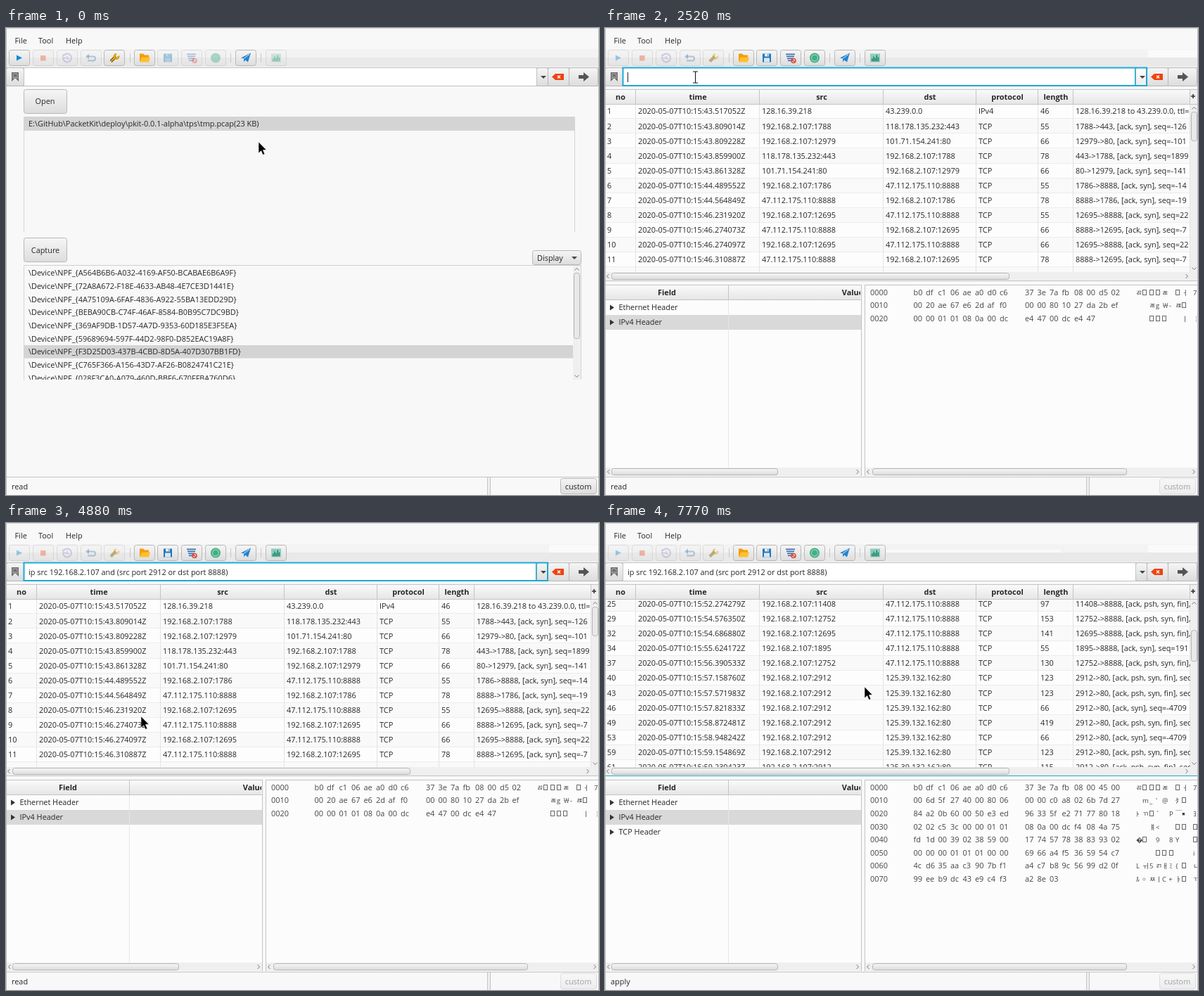
These frames come from a looping animation (843 px wide and 664 px high, 8 s). An HTML page with a canvas:

```html
<!DOCTYPE html>
<html lang="en">
<head>
<meta charset="utf-8">
<title>Packet viewer</title>
<style>
html, body { margin: 0; width: 100%; height: 100%; overflow: hidden; background: #f8f8f8; }
canvas { display: block; }
</style>
</head>
<body>
<canvas id="stage" width="843" height="664"></canvas>
<script>
const c = document.getElementById('stage').getContext('2d');
const LOOP = 8000, FONT = '"Open Sans", "Noto Sans", sans-serif';
const INK = '#262626', BLUE = '#0096c9', FOCUS = '#1fa8d4', GREY = '#d4d4d4', LINE = '#c4c4c4';
const QUERY = 'ip src 192.168.2.107 and (src port 2912 or dst port 8888)';

// Pointer tip: time, x, y; each place holds until the next one.
const POINTER = [
  [0, 359, 162], [260, 357, 157], [400, 350, 142], [1320, 349, 138],
  [1850, 290, 112], [1970, 190, 84], [2090, 128, 70], [2640, 420, 72],
  [2760, 690, 90], [2880, 768, 99], [3030, 785, 90], [3150, 783, 79],
  [3270, 772, 72], [3390, 763, 69], [3510, 759, 67], [3780, 600, 142],
  [3900, 380, 240], [4020, 217, 283], [4140, 198, 286], [4760, 196, 283],
  [4880, 192, 275], [5000, 360, 205], [5120, 620, 130], [5240, 793, 76],
  [5390, 793, 72], [5540, 810, 67], [5660, 814, 66], [6410, 800, 86],
  [6530, 735, 125], [6650, 650, 160], [6770, 560, 185], [6890, 480, 192],
  [7010, 425, 190], [7130, 400, 186], [7400, 396, 194], [7520, 382, 216], [7770, 369, 233]
];
const CARET = [[2520, 3030], [3510, 4020], [4510, 4760], [5390, 5910]];

const DEVICES = `A564B6B6-A032-4169-AF50-BCABAE6B6A9F 72A8A672-F18E-4633-AB48-4E7CE3D1441E
4A75109A-6FAF-4836-A922-55BA13EDD29D BEBA90CB-C74F-46AF-8584-B0B95C7DC9BD
369AF9DB-1D57-4A7D-9353-60D185E3F5EA 59689694-597F-44D2-98F0-D852EAC19A8F
F3D25D03-437B-4CBD-8D5A-407D307BB1FD C765F366-A156-43D7-AF26-B0824741C21E
028F3CA0-A079-460D-BBF6-670FFBA760D6`.split(/\s+/);

const HISTORY = ['udp', 'tcp', 'src port 8000', 'ip src 192.168.43.12', 'arp', 'port 8000',
  'src ip 192.168.2.114', 'ip src 192.168.2.107',
  'ip src 192.168.2.107 and (port src 2912 or port dst 8888)', QUERY];

// L, S, W, T and U shorten recurring addresses; s and f shorten flag sets.
const HOSTS = { L: '192.168.2.107', S: '47.112.175.110:8888', W: '125.39.132.162:80', T: '118.178.135.232:443', U: '101.71.154.241:80' };
const FLAGS = { s: '[ack, syn], seq=', f: '[ack, psh, syn, fin], seq=-4709' };
const host = s => HOSTS[s] || s.replace('L', HOSTS.L);
const port = s => s.split(':')[1];
function parse(text) {
  return text.trim().split('\n').map(line => {
    const [no, time, a, b, len, flag, seq = ''] = line.split(' ');
    const src = host(a), dst = host(b), tcp = flag !== '-';
    return [no, `2020-05-07T10:15:${time}Z`, src, dst, tcp ? 'TCP' : 'IPv4', len,
      tcp ? `${port(src)}->${port(dst)}, ${FLAGS[flag]}${seq}` : `${src} to ${dst}, ttl=`];
  });
}
const ALL = parse(`
1 43.517052 128.16.39.218 43.239.0.0 46 -
2 43.809014 L:1788 T 55 s -126
3 43.809228 L:12979 U 66 s -101
4 43.859900 T L:1788 78 s 1899
5 43.861328 U L:12979 66 s -141
6 44.489552 L:1786 S 55 s -14
7 44.564849 S L:1786 78 s -19
8 46.231920 L:12695 S 55 s 22
9 46.274073 S L:12695 66 s -7
10 46.274097 L:12695 S 66 s 22
11 46.310887 S L:12695 78 s -7
12 47.502161 W L:2912 66 s -18`);
const FILTERED = parse(`
6 44.489552 L:1786 S 55 s -14
8 46.231920 L:12695 S 55 s 22
10 46.274097 L:12695 S 66 s 22
13 47.549643 L:2912 W 123 f
16 48.128443 L:2912 W 123 f
20 49.254737 L:11408 S 55 s 14
23 50.557640 L:2912 W 66 s -4709
25 52.274279 L:11408 S 97 f
29 54.576350 L:12752 S 153 f
32 54.686880 L:12695 S 141 f
34 55.624172 L:1895 S 55 s 191
37 56.390533 L:12752 S 130 f
40 57.158760 L:2912 W 123 f
43 57.571983 L:2912 W 123 f
46 57.821833 L:2912 W 66 s -4709
49 58.872481 L:2912 W 419 f
53 58.948242 L:2912 W 66 s -4709
59 59.154869 L:2912 W 123 f
61 59.230423 L:2912 W 115 f`);

const HEX_A = 'b0dfc106aea0d0c6373e7afb0800d5020020ae67e62daff00000801027da2bef00000101080a00dce44700dce447';
const HEX_B = 'b0dfc106aea0d0c6373e7afb08004500006d5f27400080060000c0a8026b7d27' +
  '84a20b600050e3ed96335fe2717780180202c53c00000101080a00dcf4084a75' +
  'fd1d003902385900177457783883930200000001010100006966a4f5365954c7' +
  '4cd635aac3907bf1a4c7b89c5699d20f99eeb9dc43e9c4f3a28e03';

function rect(x, y, w, h, fill) { c.fillStyle = fill; c.fillRect(x, y, w, h); }
function box(x, y, w, h, stroke, width = 1) {
  c.strokeStyle = stroke; c.lineWidth = width;
  c.strokeRect(x + width / 2, y + width / 2, w - width, h - width);
}
// Baselines sit on whole pixels to keep the letters crisp.
function text(s, x, mid, color = INK, align = 'left', weight = 400) {
  c.font = `${weight} 10.9px ${FONT}`;
  c.textAlign = align; c.fillStyle = color; c.fillText(s, x, Math.round(mid + 3.9));
}
function poly(points, fill) {
  c.beginPath();
  for (let i = 0; i < points.length; i += 2) c.lineTo(points[i], points[i + 1]);
  c.closePath(); c.fillStyle = fill; c.fill();
}
function arc(x, y, r, color, from = 0, to = 7, width = 2) {
  c.beginPath(); c.arc(x, y, r, from, to);
  c.strokeStyle = color; c.lineWidth = width; c.stroke();
}
function path(d, color, width = 1) {
  c.strokeStyle = color; c.lineWidth = width; c.stroke(new Path2D(d));
}
function clip(x, y, w, h, draw) {
  c.save(); c.beginPath(); c.rect(x, y, w, h); c.clip(); draw(); c.restore();
}
function shade(y, h, top, bottom) {
  const g = c.createLinearGradient(0, y, 0, y + h);
  g.addColorStop(0, top); g.addColorStop(1, bottom);
  return g;
}
function round(x, y, w, h, r, fill, stroke, width = 1) {
  c.beginPath(); c.roundRect(x + .5, y + .5, w - 1, h - 1, r);
  c.fillStyle = fill; c.fill();
  c.strokeStyle = stroke; c.lineWidth = width; c.stroke();
}
function button(x, y, w, h, hot, focus) {
  round(x, y, w, h, 3, shade(y, h, hot ? '#fff' : '#f6f6f6', hot ? '#ececec' : '#dcdcdc'), focus ? FOCUS : '#b8b8b8', focus ? 2 : 1);
}
function chevron(x, y, dx, dy) {
  path(dx ? `M${x - dx} ${y - 3}L${x + dx} ${y}L${x - dx} ${y + 3}` : `M${x - 3} ${y - dy}L${x} ${y + dy}L${x + 3} ${y - dy}`, '#777');
}
const thumb = (x, y, w, h) => round(x, y, w, h, 3, w > h ? shade(y, h, '#f8f8f8', '#dadada') : '#e9e9e9', '#b4b4b4');
function hbar(x, y, w, from, to) {
  rect(x, y, w, 12, '#efefef');
  chevron(x + 4, y + 6, -1.5); chevron(x + w - 5, y + 6, 1.5);
  thumb(from, y + 1, to - from, 10);
}
function vbar(x, y, h, from, to) {
  rect(x, y, 11, h, '#efefef');
  chevron(x + 5.5, y + 5, 0, -1.5); chevron(x + 5.5, y + h - 5, 0, 1.5);
  thumb(x + 1, from, 9, to - from);
}

// Each icon is drawn around 0,0.
const ICONS = [
  [19, () => poly([-4, -4, 4, 0, -4, 4], '#1187d8')],
  [53, () => rect(-4, -3.5, 7.5, 7.5, '#ed5a32')],
  [87, () => { arc(0, 0, 6, '#9c8fc9', -2.6, 3, 2); path('M-6 -5V0H-1M0 -3V1H3', '#9c8fc9', 1.4); }],
  [121, () => { path('M-5 -2H3Q6 -2 6 1T3 4H-5', '#4d82ba', 2); poly([-8, -2, -3, -6, -3, 2], '#4d82ba'); }],
  [154, () => { path('M-5 5L2 -2', '#55451f', 4); path('M-5 5L1 -1', '#e7b51d', 2); arc(3, -2, 3, '#d7a511', -.3, 4.7, 3); }],
  [197, () => { poly([-7, -6, -2, -6, 0, -4, 6, -4, 6, 5, -7, 5], '#f59b0b'); poly([-4, -1, 8, -1, 6, 6, -7, 6], '#ffc02e'); }],
  [230, () => { rect(-6, -6, 12, 12, '#2478b8'); rect(-3, -6, 6, 4, '#e4eef6'); rect(-4, 0, 8, 6, '#d6e7f3'); rect(1, -5, 1, 2, '#2478b8'); }],
  [264, () => { for (let i = 0; i < 4; i++) rect(-7 + i, -6 + i * 3, 13 - 2 * i, 1.7, '#3a72b4'); arc(4, 4, 3, '#e04a36', 0, 7, 1.6); path('M2 2L6 6', '#e04a36', 1.4); }],
  [298, () => { c.beginPath(); c.arc(0, 0, 7, 0, 7); c.fillStyle = '#43ae84'; c.fill(); arc(0, 0, 4.5, '#8fd5b8', 0, 7, 1.3); }],
  [341, () => { poly([-7, 0, 7, -7, 3, 6, -1, 3, -3, 6, -3, 1], '#2383d0'); path('M-3 1L5 -5', '#e6f1f9', 1); }],
  [384, () => { rect(-7, -6, 14, 12, '#8fcdbb'); [4, 7, 5, 9, 6].forEach((h, i) => rect(-5 + i * 2.2, 5 - h, 1.4, h, '#147e68')); }]
];

function toolbar(t) {
  const loaded = t >= 1320;
  rect(1, 30, 841, 12, '#f3f3f3');
  rect(1, 42, 841, 13, '#e9e9e9');
  if (t >= 2520) rect(772, 31, 70, 11, '#fafafa');
  if (t >= 5540) rect(400, 38, 248, 4, '#fafafa');
  [176, 319, 362].forEach(x => rect(x, 36, 1, 13, '#c8c8c8'));
  ICONS.forEach(([x, draw], i) => {
    const on = i === 9 || i === 5 || (loaded ? i > 4 : i === 0 || i === 4);
    c.save();
    c.globalAlpha = on ? 1 : .4;
    button(x - 15, 31, 30, 23, false, i === 5 && loaded && t < 2520);
    c.translate(x, 42.5); draw();
    c.restore();
  });
}

function filterBar(t, [x, y]) {
  const focused = t >= 2520 && t < 6290;
  const hot = y > 56 && y < 83;
  rect(1, 55, 841, 28, '#f4f4f4');
  rect(0, 56, 842, 1, LINE); rect(0, 82, 842, 1, LINE);
  button(0, 56, 26, 27);
  poly([8, 63, 18, 63, 18, 76, 13, 71, 8, 76], '#6b6b6b');
  path('M10 65H16V72L13 69L10 72Z', '#b5b5b5');
  rect(26, 57, 728, 25, '#fff');
  button(754, 56, 17, 27, hot && x > 25 && x < 771);
  poly([760, 68, 768, 68, 764, 72], '#444');
  button(770, 56, 31, 27, hot && x > 770 && x < 800);
  poly([776, 69.5, 781, 65, 793, 65, 793, 74, 781, 74], '#f0420f');
  path('M784 67.5L788 71.5M788 67.5L784 71.5', '#fff', 1.2);
  button(800, 56, 42, 27, hot && x > 800, t >= 6290 && t < 7130);
  poly([814, 67, 821, 67, 821, 63, 829, 69.5, 821, 76, 821, 72, 814, 72], '#555');
  if (focused) {
    box(24.5, 55.5, 746.5, 27.5, FOCUS, 2); rect(753, 57, 1.5, 25, FOCUS);
  } else box(25, 56, 730, 27, '#c2c2c2');
  if (t >= 4760) text(QUERY, 32, 70);
  if (CARET.some(([a, b]) => t >= a && t < b)) rect(32, 63, 1, 14, '#222');
}

function startPage(t) {
  const active = t >= 800;
  button(25, 87, 62, 35); text('Open', 55.5, 104.5, INK, 'center');
  rect(25, 126, 1, 164, GREY); rect(808, 126, 1, 164, GREY);
  rect(25, 126, 784, 20, active ? BLUE : GREY);
  if (active) box(24, 125, 786, 165, FOCUS);
  text('E:\\GitHub\\PacketKit\\deploy\\pkit-0.0.1-alpha\\tps\\tmp.pcap(23 KB)', 32, 136.5, active ? '#fff' : INK);
  button(25, 298, 62, 35); text('Capture', 56, 316, INK, 'center');
  button(748, 316, 70, 21); text('Display', 755, 327);
  poly([804, 325, 812, 325, 808, 329], '#444');
  clip(25, 337, 793, 163, () => {
    rect(25, 451, 781, 18.5, GREY);
    DEVICES.forEach((id, i) => text(`\\Device\\NPF_{${id}}`, 32, 348.5 + i * 18.65));
    rect(25, 337, 793, 1, '#cfcfcf'); rect(25, 337, 1, 163, GREY);
    vbar(806, 338, 162, 348, 442);
    rect(817, 337, 1, 163, GREY);
  });
}

const COLUMNS = [[0, 44, 'no'], [44, 220, 'time'], [220, 396, 'src'], [396, 528, 'dst'], [528, 616, 'protocol'], [616, 666, 'length'], [666, 832, '']];
function heading(x, end, y, h, label) {
  rect(x, y, end - x, h, shade(y, h, '#fafafa', '#e6e6e6'));
  rect(end - 1, y, 1, h, LINE);
  text(label, (x + end) / 2, y + h / 2 + .5, INK, 'center', 700);
}

function packets(t) {
  const filtered = t >= 6290, rows = filtered ? FILTERED : ALL, pitch = 21.1;
  const scroll = t >= 7770 ? 151.2 : t >= 7520 ? 100.8 : t >= 7400 ? 50.4 : 0;
  const top = 108.2 - scroll;
  rect(1, 87, 841, 272, '#fcfcfc');
  clip(1, 108, 831, 239, () => {
    rows.forEach((row, i) => {
      const y = Math.round(top + i * pitch), picked = t >= 7130 && row[0] === '13';
      rect(1, y, 831, 21, picked ? BLUE : i % 2 ? '#f9f9f9' : '#fdfdfd');
      if (!picked) rect(1, y + 20, 831, 1, '#ececec');
      row.forEach((s, k) => {
        const [x, end] = COLUMNS[k];
        rect(end - 1, y, 1, 21, picked ? '#0783ae' : '#e3e3e3');
        text(s, x + 3, top + 10.3 + i * pitch, picked ? '#fff' : INK);
      });
    });
  });
  COLUMNS.forEach(([x, end, label]) => heading(x, end, 88, 20, label));
  rect(832, 88, 10, 20, '#efefef');
  path('M833 97H839M836 94V100', '#333', 1.6);
  rect(0, 87, 842, 1, LINE); rect(0, 108, 842, 1, LINE);
  const from = 119 + scroll * .22;
  vbar(832, 109, 238, from, from + (filtered ? 45 : 42));
  hbar(0, 347, 832, 9, 575);
  rect(832, 347, 10, 12, '#efefef');
  rect(0, 359, 842, 1, t >= 7130 ? FOCUS : LINE);
}

function details(t) {
  const tcp = t >= 7130;
  rect(1, 365, 364, 272, '#fcfcfc');
  heading(0, 176, 366, 20, 'Field');
  clip(176, 366, 187, 20, () => heading(176, 528, 366, 20, 'Value'));
  rect(0, 365, 365, 1, LINE); rect(0, 386, 365, 1, LINE);
  rect(1, 408, 363, 21, '#d9d9d9');
  rect(175, 387, 1, 238, '#e6e6e6');
  ['Ethernet Header', 'IPv4 Header', 'TCP Header'].slice(0, tcp ? 3 : 2).forEach((s, i) => {
    const y = 397.5 + i * 21;
    poly([7, y - 4, 13, y, 7, y + 4], '#333');
    text(s, 19.5, y);
  });
  hbar(1, 625, 363, 9, 246);
  rect(364, 365, 1, 273, LINE);
}

const noGlyph = b => b < 32 ? ![0, 2, 10].includes(b) : b > 190 &&
  [0xbf, 0xc0, 0xc1, 0xc8, 0xc9, 0xd0, 0xd1, 0xd8, 0xd9, 0xdd, 0xde, 0xdf, 0xe7].includes(b) || b > 238 && b < 253;
function hexPane(t) {
  rect(369, 365, 473, 272, '#fcfcfc');
  rect(369, 365, 473, 1, LINE); rect(369, 365, 1, 273, LINE);
  clip(370, 366, 472, 258, () => {
    (t >= 7130 ? HEX_B : HEX_A).match(/../g).forEach((h, i) => {
      const col = i % 16, line = i >> 4, y = Math.round(375.8 + line * 18.6), b = parseInt(h, 16);
      const right = col > 7;
      if (!col) text((line * 16).toString(16).padStart(4, '0'), 377, y, '#444');
      text(h, (right ? 597 : 438.5) + col % 8 * 17.5, y, '#444');
      const x = Math.round(755 + col * 9.3 + (right ? 7 : 0));
      if (noGlyph(b)) box(x, y - 4, 6, 8, '#666');
      else if (b > 32) {
        c.font = `9.5px "Open Sans", "Noto Sans CJK KR", "Noto Sans CJK JP", "Noto Sans CJK SC", sans-serif`;
        c.textAlign = 'left'; c.fillStyle = '#444';
        c.fillText(String.fromCharCode(b < 128 ? b : 0xff00 + b), x, y + 4);
      }
    });
  });
  hbar(370, 625, 472, 380, 742);
}

function status(t) {
  rect(0, 637, 842, 27, '#f8f8f8');
  rect(0, 638, 842, 1, LINE);
  text(t >= 6290 ? 'apply' : 'read', 8, 652);
  rect(684, 639, 5, 25, '#eee'); rect(684, 639, 1, 25, LINE); rect(688, 639, 1, 25, LINE);
  c.globalAlpha = t >= 1320 ? .4 : 1;
  button(788, 640, 52, 23); text('custom', 813.5, 652, INK, 'center');
  c.globalAlpha = 1;
}

function popup(t, [, y]) {
  c.save();
  c.shadowColor = 'rgba(0,0,0,.3)'; c.shadowBlur = 9;
  rect(25, 83, 750, 205, '#fff');
  c.restore();
  box(25, 83, 750, 205, '#c8c8c8');
  const hover = t >= 4020 ? 9 : Math.floor((y - 84) / 20.2);
  HISTORY.forEach((s, i) => {
    if (i === hover) rect(26, Math.floor(84 + i * 20.2), 736, 21, BLUE);
    text(s, 30.5, 94 + i * 20.18, i === hover ? '#fff' : INK);
  });
  vbar(763, 84, 203, 93, 261);
}

function pointer(t, [x, y]) {
  if (t >= 2090 && t < 2760) {
    path(`M${x - 3} ${y - 8}H${x + 4}M${x + .5} ${y - 8}V${y + 8}M${x - 3} ${y + 8}H${x + 4}`, '#111');
    return;
  }
  c.save();
  c.translate(x, y);
  poly([0, 0, 0, 16, 3.7, 12.6, 6.2, 18.3, 8.8, 17.2, 6.3, 11.6, 11, 11.2], '#000');
  c.strokeStyle = '#fff'; c.lineWidth = .5; c.stroke();
  c.restore();
}

function frame(now) {
  const t = now % LOOP, at = POINTER.findLast(p => p[0] <= t).slice(1);
  rect(0, 0, 843, 664, '#f8f8f8');
  [['File', 12.5], ['Tool', 46], ['Help', 85]].forEach(([s, x]) => text(s, x, 18.5));
  toolbar(t);
  filterBar(t, at);
  if (t < 1320) startPage(t);
  else { packets(t); details(t); hexPane(t); }
  status(t);
  if (t >= 3630 && t < 4760) popup(t, at);
  rect(0, 0, 1, 664, '#bdbdbd'); rect(842, 0, 1, 664, '#bdbdbd'); rect(0, 0, 843, 1, '#d8d8d8');
  pointer(t, at);
}
const start = performance.now();
(function tick() {
  frame(Math.max(0, performance.now() - start));
  requestAnimationFrame(tick);
})();
</script>
</body>
</html>
```
